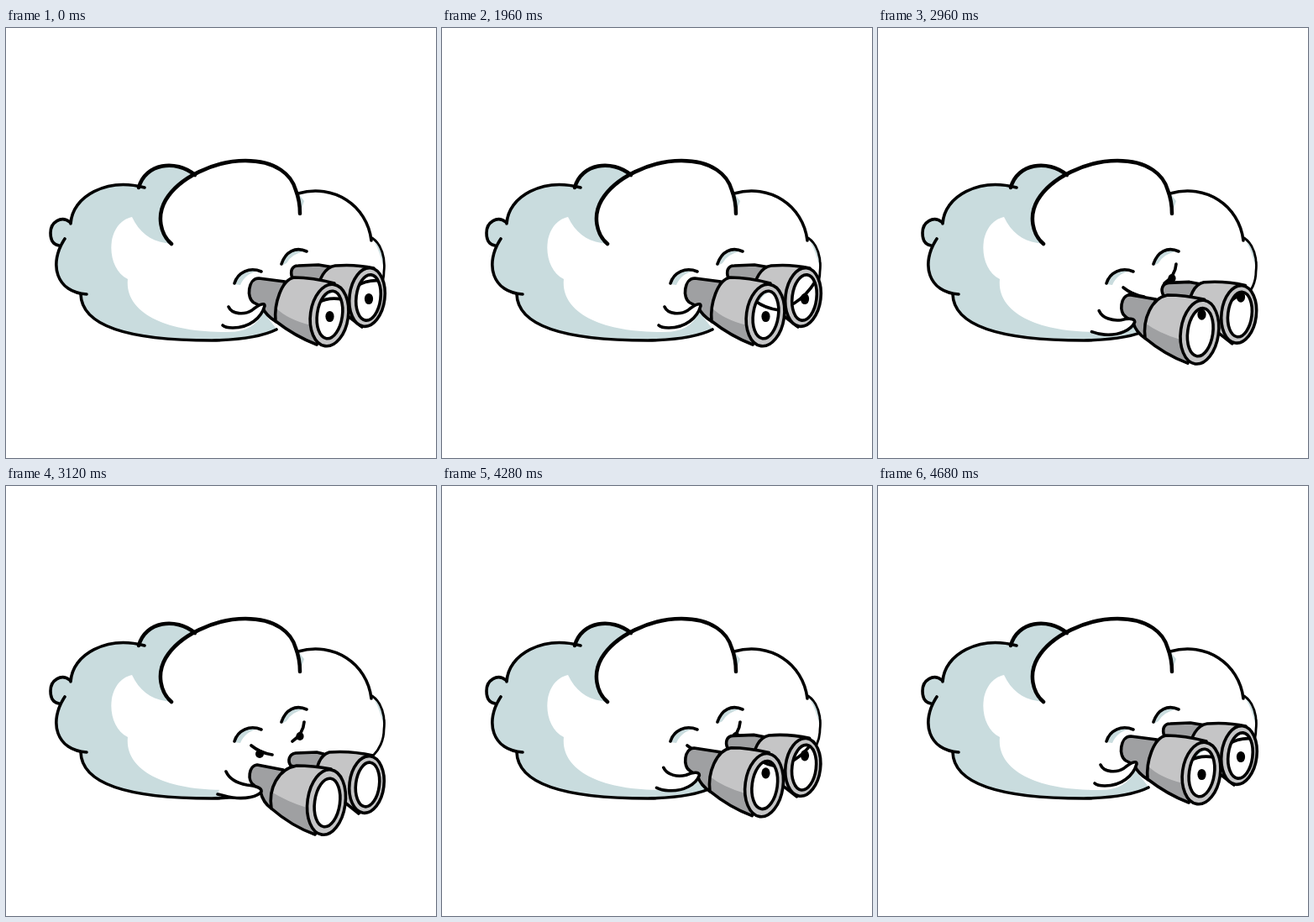
Write an HTML page that moves like this. It is 512 px wide and 512 px high and loops after 5 s.

```html
<!DOCTYPE html>
<html lang="en">
<head>
<meta charset="utf-8">
<title>Cloud with binoculars</title>
<style>
  html, body { margin: 0; width: 100%; height: 100%; overflow: hidden; background: #fff; }
  svg { display: block; width: 100%; height: 100%; }
  .line { fill: none; stroke: #000; stroke-width: 3.6; stroke-linecap: round; stroke-linejoin: round; }
  .bold { stroke-width: 4.5; }
  .thin { stroke-width: 2.8; }
  .shade { fill: #c9dcde; }
  .light { fill: #c5c5c6; }
  .dark { fill: #9fa0a2; }
  .white { fill: #fff; }
</style>
</head>
<body>
<svg viewBox="0 0 512 512">
  <defs>
    <clipPath id="clipL"><ellipse data-oval="lensL"/></clipPath>
    <clipPath id="clipR"><ellipse data-oval="lensR"/></clipPath>
  </defs>

  <g id="cloud">
    <path class="shade" d="M197 257C184 246 179 224 190 205Q201 187 225 175C202 156 166 161 158 190C120 178 79 200 77 233C67 222 53 230 53 245C53 254 58 259 64 259C53 282 60 314 91 317C90 351 135 372 245 372Q298 371 322 358L306 338Q296 362 265 362C188 363 141 338 145 299C118 286 118 232 150 225C160 246 175 255 197 257Z"/>
    <path class="shade" d="M348 197L350 221L355 206Z"/>
    <path class="shade" d="M437 252C447 257 452 272 450 288Q446 266 437 252Z"/>
    <path class="line" d="M76 231C66 223 53 231 53 244C53 253 57 258 63 259"/>
    <path class="line" d="M77 233C79 200 120 178 165 190"/>
    <path class="line bold" d="M158 190C166 161 202 156 225 175"/>
    <path class="line" d="M70 251C50 281 60 315 96 317"/>
    <path class="line" d="M89 317C90 351 135 372 245 372Q298 371 322 359"/>
    <path class="line bold" d="M197 257C184 246 179 224 190 205C206 178 248 158 285 158C322 158 340 175 345 193Q350 206 350 221"/>
    <path class="line" d="M348 197C390 185 430 211 435 253"/>
    <path class="line thin" d="M436 250C447 257 452 274 450 290C450 303 444 314 438 320"/>
    <path class="shade" d="M272 305C276 290 290 284 301 289Q285 292 279 306Z"/>
    <path class="shade" d="M328 283C330 267 344 261 355 266Q340 269 334 280Z"/>
    <path class="line" d="M272 304C276 291 290 284 304 290"/>
    <path class="line" d="M328 281C333 266 345 260 358 266"/>
  </g>

  <g id="face">
    <ellipse cx="302" cy="319" rx="5" ry="5"/>
    <ellipse cx="350" cy="298" rx="4.6" ry="5"/>
    <path class="line" d="M292 309Q303 318 317 320M355 281Q354 295 341 304"/>
  </g>

  <path class="line dark" data-path="tubeR"/>
  <path class="line light" data-path="barrelR"/>
  <ellipse class="line light" data-oval="ringR"/>
  <ellipse class="white" data-oval="lensR"/>
  <g clip-path="url(#clipR)"><g class="eye">
    <path class="shade" d="M418 304Q424 293 436 294Q426 297 424 303Z"/>
    <ellipse class="pupil" cx="432" cy="322.5" rx="5.1" ry="6.6"/>
    <path class="line" data-lid="right"/>
  </g></g>
  <ellipse class="line" data-oval="lensR"/>

  <path class="line dark" data-path="tubeL"/>
  <path class="line white" data-path="hand"/>
  <path class="light" data-path="barrelL"/>
  <path class="dark" data-path="barrelShade"/>
  <path class="line" data-path="barrelL"/>
  <ellipse class="line light" data-oval="ringL"/>
  <ellipse class="white" data-oval="lensL"/>
  <g clip-path="url(#clipL)"><g class="eye">
    <path class="shade" d="M372 326Q378 313 391 314Q381 318 379 325Z"/>
    <ellipse class="pupil" cx="385.5" cy="343.5" rx="5.1" ry="6.6"/>
    <path class="line" data-lid="left"/>
  </g></g>
  <ellipse class="line" data-oval="lensL"/>
</svg>

<script>
// Each pair is [raised, lowered].
const paths = {
  tubeR: ["M348 283C340 283 338 290 341 298L390 303L390 285L372 282Z",
          "M345 318C337 319 335 327 339 333L378 342L378 319L370 317Z"],
  barrelR: ["M392 283C380 285 372 298 371 315L424 356L438 286Q416 281 392 283Z",
            "M385 317C374 320 368 335 370 350L420 390L437 321Q410 315 385 317Z"],
  tubeL: ["M301 298C288 298 286 322 295 327L305 332Q309 342 322 350L332 302Z",
          "M299 332C289 333 287 351 295 356L303 364Q306 377 316 384L330 338Z"],
  hand: ["M265 332C269 341 284 342 293 336C300 330 308 326 308 331C304 345 290 357 270 357C264 357 260 356 258 354",
         "M262 340C266 349 276 354 287 356C296 357 305 359 304 364C300 370 285 373 270 371C262 370 257 368 252 367"],
  barrelL: ["M343 297C328 300 319 328 321 349Q344 367 370 377L391 304Q365 297 343 297Z",
            "M346 333C324 337 312 360 316 384Q340 405 368 415L387 337Q365 333 346 333Z"],
  barrelShade: ["M321 333Q335 347 363 354L370 377Q344 367 321 349Z",
                "M314 363Q335 376 358 383L368 415Q340 405 316 384Z"]
};
// cx cy rx ry tilt
const ovals = {
  ringR: ["430 320.5 21 35 7", "429.5 355.5 20.5 34 7"],
  lensR: ["431.5 321 14.5 27.3 7", "430.5 355.5 14 26.5 7"],
  ringL: ["385 342 22.5 37 8", "381.5 376.5 22.5 39 8"],
  lensL: ["385.5 341.5 15 28.5 8", "382.5 377 15 29 8"]
};
// [calm, angry]
const lids = {
  left: ["M371 327Q384 320 400 323", "M373 325Q385 334 402 336"],
  right: ["M416 308Q430 299 447 301", "M419 328Q434 319 445 301"]
};

const all = selector => document.querySelectorAll(selector);
const clamp = x => Math.max(0, Math.min(1, x));
const smooth = x => x * x * (3 - 2 * x);
const ramp = (t, from, to) => clamp((t - from) / (to - from));

function mix([a, b], k) {
  const ends = b.match(/[\d.]+/g);
  let i = 0;
  return a.replace(/[\d.]+/g, n => (+n + (ends[i++] - n) * k).toFixed(2));
}

// Gaze shifts: start time, end time, offset x, offset y
const gaze = [[0, 80, -5, 4], [1000, 1080, 8, -8], [1880, 1960, 0, 0]];

function look(t) {
  // The loop opens with the gaze centred, then halfway to the first shift.
  let x = 0, y = 0;
  for (const [from, to, gx, gy] of gaze) {
    const k = ramp(t, from, to);
    x += (gx - x) * k;
    y += (gy - y) * k;
  }
  return `translate(${x} ${y})`;
}

function draw(t) {
  const low = smooth(ramp(t, 2760, 3120)) - smooth(ramp(t, 4000, 4500));
  const anger = ramp(t, 1880, 1960) - smooth(ramp(t, 4560, 4680));

  all("[data-path]").forEach(el => el.setAttribute("d", mix(paths[el.dataset.path], low)));
  all("[data-lid]").forEach(el => el.setAttribute("d", mix(lids[el.dataset.lid], anger)));
  all("[data-oval]").forEach(el => {
    const [cx, cy, rx, ry, tilt] = mix(ovals[el.dataset.oval], low).split(" ");
    el.setAttribute("rx", rx);
    el.setAttribute("ry", ry);
    el.setAttribute("transform", `translate(${cx} ${cy}) rotate(${tilt})`);
  });
  all(".eye").forEach(el => el.setAttribute("transform", `translate(0 ${-4 * low})`));
  all(".pupil").forEach(el => el.setAttribute("transform", look(t)));
  document.getElementById("face").style.display = low > 0 ? "" : "none";
}

function tick() {
  draw(Math.floor(performance.now() % 5000 / 40) * 40);
  requestAnimationFrame(tick);
}
tick();
</script>
</body>
</html>
```
